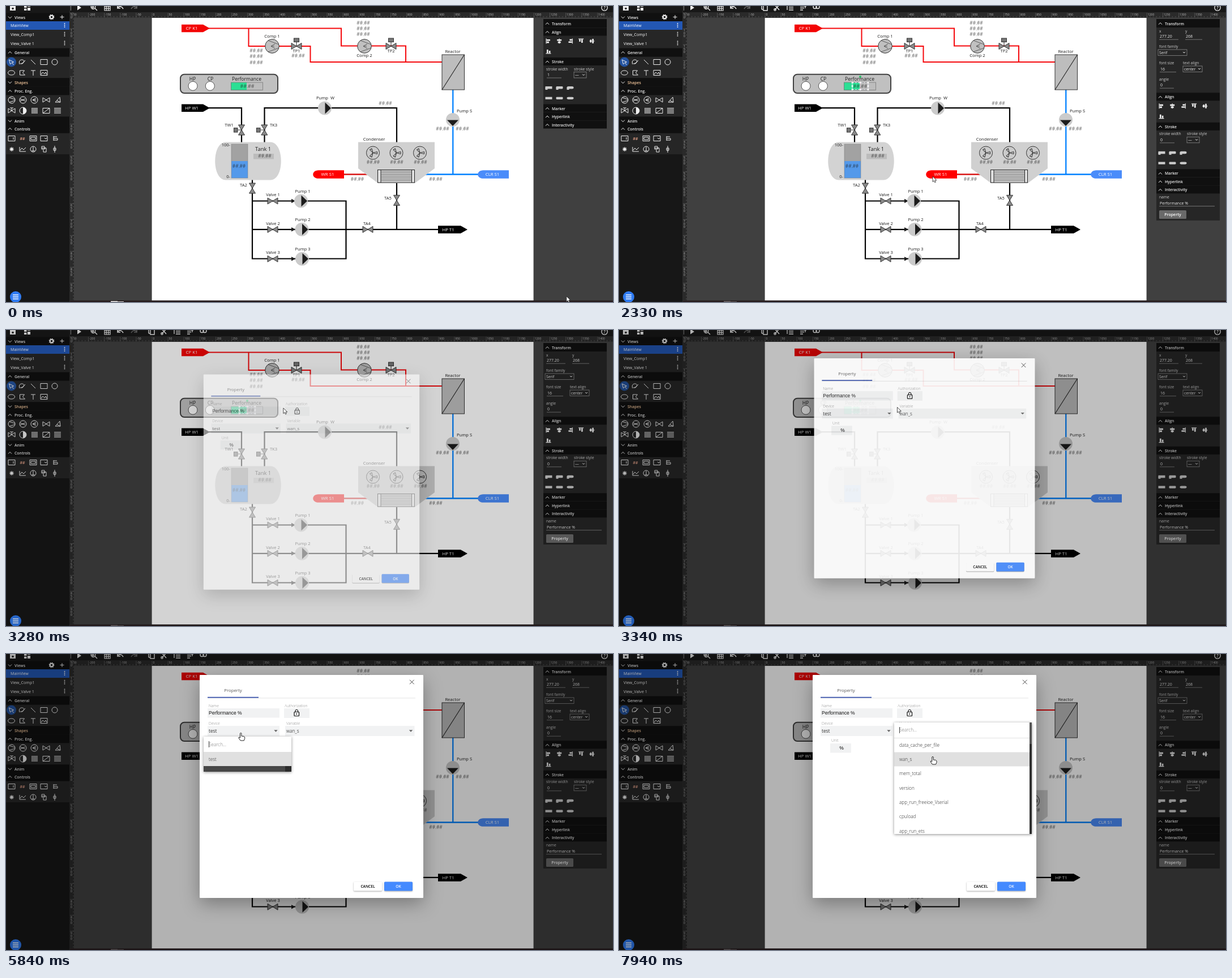
Write an HTML page that moves like this. It is 1072 px wide and 523 px high and loops after 8000 ms.

```html
<!DOCTYPE html>
<html lang="en">
<head>
<meta charset="utf-8">
<title>Process editor</title>
<style>
html, body { margin: 0; width: 100%; height: 100%; overflow: hidden; background: #000; }
svg { display: block; width: 1072px; height: 523px; font-family: "Open Sans", "Noto Sans", sans-serif; }
.m { text-anchor: middle; }
.e { text-anchor: end; }
.b { font-weight: 600; }
.l { font-weight: 300; }
.ico { fill: none; stroke: #eee; stroke-width: 1; }
.btn { filter: drop-shadow(0 1px .8px rgba(0,0,0,.35)); }
#dialog { filter: drop-shadow(0 10px 16px rgba(0,0,0,.32)); }
.drop { filter: drop-shadow(0 1.5px 2.5px rgba(0,0,0,.45)); }
</style>
</head>
<body>
<svg id="stage" viewBox="0 0 1072 523"></svg>
<script>
const P = (d, a = '') => `<path d="${d}" ${a}/>`;
const R = (x, y, w, h, f, a = '') => `<rect x="${x}" y="${y}" width="${w}" height="${h}" fill="${f}" ${a}/>`;
const C = (x, y, r, f, a = '') => `<circle cx="${x}" cy="${y}" r="${r}" fill="${f}" ${a}/>`;
const T = (x, y, s, z = 7.5, a = '') => `<text x="${x}" y="${y}" font-size="${z}" ${a}>${s}</text>`;
const G = (s, a = '') => `<g ${a}>${s}</g>`;
const at = (x, y, s, turn = 0) => G(s, `transform="translate(${x} ${y}) rotate(${turn})"`);
const M = 'class="m"', W = 'fill="#fff"', B = 'class="b" fill="#eee"';
const HEAD = '#101010', BODY = '#262626';
const line = (d, c = '#000', w = 2.2) => P(d, `fill="none" stroke="${c}" stroke-width="${w}"`);
const icon = (x, y, d, a = '') => at(x, y, P(d, `class="ico" ${a}`));
const hash = (x, y, z = 8.3) => T(x, y, '##.##', z, 'class="m l"');
const chevron = (x, y, up) => icon(x, y, up ? 'M-3 1.7L0-1.5 3 1.7' : 'M-3-1.5L0 1.7 3-1.5', 'stroke-width="1.5"');

function rulers() {
  let s = R(113, 11, 959, 9.5, '#2a2a2a') + R(113, 11, 7, 509, '#2a2a2a'), ticks = '';
  for (let v = -250; v <= 1400; v += 50) {
    const x = 258 + v * .562;
    s += T(x + 1.5, 16.5, v < -200 ? '50' : v, 5, 'fill="#bbb"');
    ticks += `M${x} 12V20`;
  }
  for (let x = 123.1; x < 1072; x += 5.62) ticks += `M${x} 18V20`;
  for (let v = 50; v <= 900; v += 50) {
    const y = -16 + v * .562;
    [...'' + v].forEach((c, i) => { s += T(114, y + 5 + i * 5, c, 5, 'fill="#bbb"'); });
    ticks += `M113 ${y}H120`;
  }
  for (let y = 23; y < 520; y += 5.62) ticks += `M118 ${y}H120`;
  return s + P(ticks, 'stroke="#777" stroke-width=".5"');
}

function toolbar() {
  return R(0, 0, 1072, 11, '#181818') +
    P('M7-2H15L17 0V8H7Z', 'fill="#eee"') + C(12, 4.5, 1.8, '#181818') +
    P('M32-2h4.5v5h-4.5zM38-2h5v3h-5zM32 4.5h4.5V8H32zM38 3h5v5h-5z', 'fill="#eee"') +
    R(114, 0, 1, 8, '#888') + P('M126-2L133 3 126 7.5Z', 'fill="#eee"') +
    line('M157 4L161 8M151 2H156M153.5-1V5', '#eee', 1.4) + C(154, 1.5, 3.8, 'none', 'stroke="#eee" stroke-width="1.3"') +
    line('M174-2V8H184V-2M174 1H184M174 4.5H184M177.3-2V8M180.7-2V8', '#eee', 1.2) +
    line('M197-1V4H202M197 3Q203-2 207 5', '#eee', 1.6) + line('M231-1V4H226M231 3Q225-2 221 5', '#666', 1.6) +
    C(1057, 3, 5.2, 'none', 'stroke="#eee" stroke-width="1.3"') + T(1057, 6, '?', 8, 'class="m b" fill="#eee"');
}

function sidebar() {
  let s = R(0, 11, 112, 512, '#171717') + R(112, 0, 1, 523, '#2b2b2b');
  const head = (y, name, up, c = '#eee') =>
    R(0, y - 7.5, 112, 14.5, HEAD) + chevron(7, y, up) + T(15, y + 2.6, name, 6.9, `class="b" fill="${c}"`);
  [[42, 33], [90, 37], [157.5, 38], [225, 37]].forEach(([y, h]) => s += R(0, y, 112, h, BODY));
  s += head(20, 'Views', 0) + R(0, 27, 112, 15, '#2357b4');
  ['MainView', 'View_Comp1', 'View_Valve 1'].forEach((n, i) => {
    const y = 34.5 + i * 15.7;
    s += T(8, y + 2.7, n, 7.1, W) + [-3, 0, 3].map(d => C(103.5, y + d - .5, .9, '#fff')).join('');
  });
  s += C(80.5, 19.5, 2.8, 'none', 'stroke="#eee" stroke-width="2"') +
    C(80.5, 19.5, 4.3, 'none', 'stroke="#eee" stroke-width="1.2" stroke-dasharray="1.7 1.68"') + icon(99, 19.5, 'M-3.5 0H3.5M0-3.5V3.5', 'stroke-width="1.3"');
  s += head(82, 'General', 1) + head(135, 'Shapes', 0, '#f3c79c') + head(150, 'Proc. Eng.', 1) + head(203, 'Anim', 0) + head(217, 'Controls', 1);
  const box = 'M-6-4.5H6V4.5H-6Z', ring = 'M-6 0A6 6 0 1 0 6 0A6 6 0 1 0-6 0Z', bow = 'M-6-4L6 4V-4L-6 4Z';
  s += C(9.5, 99, 8.5, '#24539f');
  [[9.5, 99, 'M-4-4L4 0 1 1 4 5M-4-4L-2 4 1 1'], [29, 99, 'M-5 4C-9-7 6-5 2 0S-7 2 0 3L5-3'], [48, 99, 'M-4-4L4 4'], [67, 99, box],
   [86, 99, 'M-5 0A5 5 0 1 0 5 0A5 5 0 1 0-5 0'], [9.5, 118, 'M-6 0A6 4 0 1 0 6 0A6 4 0 1 0-6 0'], [28.5, 118, 'M-4-4H4L1 0 5 4H-4Z'],
   [48, 118, 'M-4-4H4M0-4V5', 1.4], [67, 118, box + 'M-5 3L-2-1 1 2 3-1 5 3'], [10, 166, ring + 'M-4-4L6-1M-4 4L6 1'],
   [30, 166, ring + 'M-5-2L4 2M-5 2L4-2', 1.4], [50, 166, ring + 'M3-3L-3 0 3 3M-3 0H3'], [71, 166, bow], [92, 166, 'M-5 4L3-5 4 4ZM-2 1L4 4'],
   [10, 185, bow + 'M0 0V-5M-3-5H3'], [30, 185, ring], [71, 185, box + 'M-6 4.5L6-4.5'], [10, 234, box + 'M3-2V2'],
   [48, 234, box + 'M-4-2H4V2H-4Z', 1.4], [67, 234, box + 'M1-1L3 1 5-1'], [87, 234, 'M-3-4V4M-3-3H3M-3 0H4V3H-3'],
   [10, 253, 'M-4 0H4M0-4V4M-3-3L3 3M3-3L-3 3'], [29, 253, 'M-5-4V4H6M-4 2L-1-2 2 1 6-3'], [48, 253, 'M-5 0A5 5 0 1 0 5 0A5 5 0 1 0-5 0M0 3V-4M-3 3H3'],
   [67, 253, 'M-4-5H1V0H-4ZM0-2H4V5H-1V1M-4-2H3'], [86, 253, 'M0-6V6M-2-2H2V2H-2Z', 1.6]
  ].forEach(([x, y, d, w = 1]) => s += icon(x, y, d, `stroke-width="${w}"`));
  s += P('M30 179A6 6 0 0 1 30 191Z', 'fill="#eee"') + C(10, 253, 2.6, '#eee') + T(29, 236.5, '##', 7, 'class="m b" fill="#e9a58b"');
  for (let i = 0; i < 5; i++) s += line(`M45 ${180.5 + i * 2.2}H56M${45.8 + i * 2.3} 180V190`, '#ddd', .7) + line(`M85 ${180.5 + i * 2.2}H97`, '#ddd', 1);
  return s + C(17, 514, 10, '#2f7bf2') + line('M12 510.5H22M12 514H22M12 517.5H22', '#fff', 1.5);
}

const DARK = 'stroke="#333" stroke-width="1"';
const valve = (x, y, turn = 0, motor = 0) => at(x, y,
  (motor ? line('M0 0V-9', '#444', 1.2) + R(-4.5, -14, 9, 6.5, '#777', DARK) : '') +
  P('M-9-5.5L9 5.5V-5.5L-9 5.5Z', `fill="#8a8a8a" ${DARK}`), turn);
const pump = (x, y, turn = 0) => at(x, y, C(0, 0, 12, '#cbcbcb') + P('M.5-10L11 0 .5 10Z'), turn);
const comp = (x, y) => at(x, y, C(0, 0, 12.3, '#c0c0c0', DARK) +
  line('M-7-10L12-3M-7 10L12 3M5-4L-2 0 5 4M-2 0H4', '#444', .8));
const fan = x => at(x, 259.5, C(0, 0, 11.5, '#cbcbcb', DARK) + [0, 120, 240].map(a =>
  P('M0 0L7.5-2V2Z', `transform="rotate(${a})" fill="none" ${DARK} stroke-linejoin="round"`)).join(''));
const arrowTag = (x, y, name, c = '#000', w = 50) => at(x, y,
  P(`M0-6.8H${w - 12}L${w} 0 ${w - 12} 6.8H0Z`, `fill="${c}"`) + T(18, 2.9, name, 7.8, `${M} ${W}`));
const roundTag = (x, name, c) => at(x, 297.5,
  P('M10-7.3H55V7.3H10C-3 7.3-3-7.3 10-7.3Z', `fill="${c}"`) + T(26, 2.9, name, 7.8, `${M} ${W}`));

function diagram() {
  const red = '#f5080c', blue = '#0080ff';
  let s = R(257.6, 21, 674, 499.5, '#fff');
  s += line('M358 39.5H592V70.5H706V99M428.5 39.5V71H537.5V99H770', red, 2) +
    line('M789.3 148V297.5M722 297.5H836', blue, 2.3) + line('M596 297.5H656', '#d81313', 2.3) +
    line('M358 180.2H416V241M456.5 241V180.2H690V395M435 307V446.5H600.5V344.5H435M435 394.8H765');
  s += arrowTag(310, 39.5, 'CP K1', '#f30505') + arrowTag(310, 180.2, 'HP W1') + arrowTag(763, 395, 'HP T1', '#000', 52);
  s += comp(470, 71) + comp(633, 71) + valve(513, 71, 0, 1) + valve(680, 71, 0, 1);
  s += R(308, 120.7, 172, 33.3, '#c0c0c0', 'rx="7" stroke="#424242" stroke-width="2"') +
    C(330, 141.3, 8, '#fff', 'stroke="#555"') + C(360.3, 141.3, 8, '#fff', 'stroke="#555"') +
    T(329.5, 131.5, 'HP', 8.6, M) + T(361, 131.5, 'CP', 8.6, M) + T(425, 131.7, 'Performance', 8.6, M) +
    R(397, 135, 28, 14, '#2bdf94') + R(425, 135, 28, 14, '#bdbdbd') + R(397.5, 135, 56, 13.5, 'none', 'stroke="#777" stroke-width=".8"') + hash(426, 144.5, 8.9);
  s += P('M388 240.5H467C492 240.5 492 307.5 467 307.5H388C363 307.5 363 240.5 388 240.5Z', 'fill="#d3d3d3"') +
    R(398, 244, 29, 30, '#a2a2a2') + R(398, 274, 29, 30, '#5499ea') + R(398, 244, 29, 60, 'none', 'stroke="#777" stroke-width=".5"') +
    T(396, 248.3, '100-', 7.5, 'class="e"') + T(396, 304, '0-', 7.5, 'class="e"') + hash(411.5, 286) +
    T(440, 256, 'Tank 1', 9.4) + R(437, 261, 36, 9.5, '#bcbcbc') + hash(457, 268.2);
  s += valve(416, 219, 90) + valve(456.3, 219, 90) + R(402.5, 215.5, 6.5, 7.5, '#777', DARK) + R(442.5, 215.5, 6.5, 7.5, '#777', DARK) +
    line('M409 219H416M449 219H456', '#444', 1.2) + valve(435, 322, 90) + valve(690, 343.3, 90) + valve(639, 394.8);
  s += pump(563, 180.5) + pump(789, 201, 90);
  [[344.5, 521], [394.8, 522.5], [446.7, 523]].forEach(([y, x], i) => {
    s += valve(471, y) + P(`M504 ${y - 3.7}L511 ${y} 504 ${y + 3.7}Z`) + pump(x, y) +
      T(471.5, y - 8.3, 'Valve ' + (i + 1), 7.5, M) + T(524, y - 15, 'Pump ' + (i + 1), 7.5, M);
  });
  s += P('M622 240.5H757V287L722 313H657L622 287Z', 'fill="#d0d0d0"') + fan(648) + fan(689.5) + fan(731);
  s += R(656.5, 289.5, 65, 22.5, '#e2e2e2', 'stroke="#222"') + line('M662 289.5V312M716.5 289.5V312', '#222', 1);
  for (let y = 292; y < 311; y += 2.8) s += line(`M662 ${y}H716.5`, '#444', .9);
  s += roundTag(542, 'WR S1', '#ff0000') + roundTag(833, 'CLR S1', '#4a8cfa');
  s += R(770, 86, 39.5, 62, '#bdbdbd', DARK) + line('M770 148L809.5 86', '#222', 1.1);
  [[470, 56, 'Comp 1'], [633, 90, 'Comp 2'], [513, 82, 'TP1'], [680, 82, 'TP2'], [789, 83, 'Reactor'], [564, 165, 'Pump&#160; W'],
   [809.5, 187.5, 'Pump S'], [394, 212.5, 'TW1'], [472.5, 212.5, 'TK3'], [419.5, 319, 'TA2'], [674.5, 341.5, 'TA5'], [637.5, 386.5, 'TA4'], [650, 238.3, 'Condenser']
  ].forEach(([x, y, n]) => s += T(x, y, n, 7.6, M));
  [[442, 82], [442, 92.3], [442, 102.5], [516, 91], [631, 33], [631, 43], [631, 53], [670, 175], [771, 219.5], [806, 219.5],
   [648.5, 279], [690, 279], [732, 279], [620.5, 308.5], [759, 308.5]].forEach(([x, y]) => s += hash(x, y));
  return G(s, 'fill="#1c1c1c"');
}

const section = (y, name) => R(949, y - 7.5, 112, 14, HEAD) + chevron(956, y, 1) + T(964, y + 2.7, name, 6.8, B);
const label = (x, y, s) => T(x, y, s, 6.7, 'fill="#ccc"');
const field = (x, y, s, w, id = '') => T(x, y, s, 7, `fill="#eee" ${id}`) + line(`M${x - 1} ${y + 3.2}H${x + w}`, '#aaa', .6);
const select = (x, y, w, s) => R(x, y, w, 10.5, 'none', 'stroke="#999" stroke-width=".7"') +
  T(x + 2, y + 7.8, s, 6.8, 'fill="#eee"') + icon(x + w - 5, y + 5, 'M-2-1L0 1 2-1');

function sidePanel() {
  const side = 'M-4.5-4.5h1.2v9h-1.2zM-3-3h6v2.6h-6zM-3 .8h4v2.6h-4z';
  const centre = 'M-.6-4.5h1.2v9h-1.2zM-4-3h8v2.6h-8zM-2.5.8h5v2.6h-5z';
  const align = [[side, 0], [centre, 0], [side, 180], [side, 90], [centre, 90], [side, 270]].map(([d, turn], i) =>
    at(958 + i % 5 * 19.2, i < 5 ? 62 : 80, P(d, 'fill="#eee"'), turn)).join('');
  const ends = [0, 1, 2].map(i => {
    const x = 952.5 + i * 19, round = `rx="${i * 1.4}"`;
    return R(x, 142, 12, 4.5, '#ccc', round) + R(x, 144, 4, 4, '#ccc') + R(x, 160.7, 12, 4.2, '#ccc', round);
  }).join('');
  const mid = R(949, 38, 112, 178, BODY) + section(46, 'Align') + align + section(98.5, 'Stroke') +
    label(954, 113.5, 'stroke width') + label(1003, 113.5, 'stroke style') + field(956, 123.8, '1', 25, 'id="strokeW"') + select(1003, 116.5, 22, '—') +
    ends + section(181, 'Marker') + section(195.5, 'Hyperlink') + section(210, 'Interactivity');
  const extra = R(949, 38, 112, 341, BODY) + label(954, 46.5, 'x') + label(1000, 46.5, 'y') + field(955, 56, '277.20', 33) + field(1001, 56, '268', 29) +
    label(954, 74, 'font family') + select(952, 77, 51, 'Serif') + label(954, 103, 'font size') + label(996, 103, 'text align') +
    field(956, 113.5, '16', 28) + select(996, 106, 34, 'center') + label(954, 131.5, 'angle') + field(956, 142, '0', 24) +
    label(954, 340, 'name') + field(955, 350.5, 'Performance %', 97) + R(954, 361, 48, 15, '#6a6a6a', 'rx="1.5"') + T(978, 371.3, 'Property', 7, 'class="m b" fill="#fff"');
  return R(949, 23, 112, 15, HEAD) + G(extra, 'class="sel"') + G(mid, 'id="mid"') + section(31, 'Transform');
}

function selection() {
  let s = R(412, 135.5, 28, 12, 'none', 'stroke="#eef" stroke-width="1.1" stroke-dasharray="3 2"') + C(426, 125, 2, '#27c268');
  [412, 426, 440].forEach(x => [135.5, 141.5, 147.5].forEach(y => { if (x !== 426 || y !== 141.5) s += R(x - 1.3, y - 1.3, 2.6, 2.6, '#fff'); }));
  s += line('M252 0V6M252 6H254M255-2H262V8H255Z', '#eee', 1.4) + line('M275-2L283 7M283-2L275 7', '#eee', 1.5) +
    C(275.5, 6.5, 1.8, 'none', 'stroke="#eee" stroke-width="1.2"') + line('M300 0H308M300 3.5H308M300 7H308M297-2V7M320 0H331M320 3.5H327M320 7H325M329 0V4', '#eee', 1.3) +
    [343, 348].map(x => R(x, -1, 6, 5.5, 'none', 'rx="2.7" stroke="#eee" stroke-width="1.4"')).join('');
  return G(s, 'class="sel"');
}

function dialog() {
  const soft = '#f1f2f3', arial = 'font-family="Liberation Sans, sans-serif"';
  const cap = (x, y, s) => T(x, y, s, 6.7, 'class="l" fill="#888"');
  const tri = x => P(`M${x - 3.2} 134.3H${x + 3.2}L${x} 137.7Z`, 'fill="#666"');
  return R(342, 37, 395, 394, '#fff', 'rx="1"') + line('M713 45.7L720.6 53.3M720.6 45.7L713 53.3', '#444', 1) +
    T(401, 67.3, 'Property', 7.8, `${M} fill="#555"`) + R(356, 77.5, 367, .8, '#ddd') + R(356, 75.8, 90, 1.8, '#3e57ad') +
    cap(358, 93.5, 'Name') + cap(492, 93.5, 'Authorization') + cap(358, 125, 'Device') + cap(495, 125, 'Variable') + cap(375, 155.3, 'Unit') +
    R(356, 96, 127, 16.5, soft) + R(491, 96, 45, 17, soft) + R(356, 127, 127, 18, soft) + R(493, 127, 228.5, 18, soft) + R(373, 158, 37, 16.5, soft) +
    T(358, 107.2, 'Performance %', 8.5, `${arial} fill="#111"`) + T(393, 169.3, '%', 8.5, `${M} ${arial}`) +
    R(509, 102.5, 8.5, 7, 'none', 'rx=".8" stroke="#111" stroke-width="1.2"') + line('M511 102V100Q513.2 96.5 515.5 100V102.5', '#111', 1.2) + C(513.2, 106, 1, '#111') +
    T(358, 139, 'test', 8.3, 'fill="#333"') + T(495, 139, 'wan_s', 8.3, 'class="l"') + tri(476.5) + tri(715) +
    R(614, 402.6, 50, 16, '#fff', 'rx="1.5" class="btn"') + R(668, 402.6, 50, 16, '#448aff', 'rx="1.5" class="btn"') +
    T(639, 413.2, 'CANCEL', 6.6, 'class="m b"') + T(693, 413.2, 'OK', 6.6, 'class="m b" fill="#fff"');
}

const search = (x, y) => T(x, y, 'Search...', 8.2, 'class="l" fill="#777"');
const caret = (x, y) => R(x, y, .8, 11, '#111', 'class="caret"');
const deviceList = () => R(349, 146, 155, 62, '#fff') + search(358, 162.5) + caret(358, 154) + R(349, 173, 155, 25, '#e0e0e0') +
  G(R(349, 173, 145, 25, '#000', 'rx="3" opacity=".06"') + R(349, 173, 155, 25, '#000', 'opacity=".12"'), 'id="ripple"') +
  T(358, 189, 'test', 8.2, 'class="l" fill="#333"') + R(349, 198, 155, 10, '#474747') + R(493, 198, 11, 10, '#2c2c2c');
const names = ['data_cache_per_file', 'wan_s', 'mem_total', 'version', 'app_run_freeioe_Vserial', 'cpuload', 'app_run_ets'];
const variableList = () => R(486, 121, 243, 197, '#fff') + search(495, 137) + caret(495, 129) + R(486, 148, 239, .8, '#ddd') + R(486, 173.5, 239, 25, '#e0e0e0') +
  names.map((n, i) => T(495, 163.5 + i * 25.35, n, 8.2, 'class="l" fill="#222"')).join('') +
  R(725, 121, 4, 197, '#2f2f2f') + R(725, 121, 4, 38, '#555');

const cursors = P('M0 0V9.6L2.2 7.6 3.7 10.8 5.4 10.1 4 6.9H7Z', 'id="arrow" fill="#fff" stroke="#222" stroke-width=".8"') +
  P('M-1.2 1Q0-.5 1.2 1V6Q7 6 7 8V10.5L5.5 14H-.5L-4 9Q-4 7-1.2 9Z', 'id="hand" fill="#fff" stroke="#222" stroke-width="1"') +
  P('M0-9L3-5H1V-1H5V-3L9 0 5 3V1H1V5H3L0 9-3 5H-1V1H-5V3L-9 0-5-3V-1H-1V-5H-3Z', 'id="move" fill="#222" stroke="#fff" stroke-width=".7"');

const $ = id => document.getElementById(id);
$('stage').innerHTML = R(0, 0, 1072, 523, '#404040') + diagram() + rulers() + toolbar() + sidebar() + sidePanel() + selection() +
  R(113, 520.5, 959, 2.5, '#251a1c') + G(R(185, 521.5, 12, 1.5, '#fff') + R(197, 522, 11, 1, '#ddd'), 'id="strip"') +
  R(0, 0, 1072, 523, '#000', 'id="shade"') + G(dialog(), 'id="dialog"') +
  G(deviceList(), 'id="list1" class="drop"') + G(variableList(), 'id="list2" class="drop"') + G(cursors, 'id="cursor"');
const sel = document.querySelectorAll('.sel'), carets = document.querySelectorAll('.caret');

// Rows are [time, ...values]; values are interpolated between rows.
const path = [[0, 990, 513], [70, 980, 505], [350, 640, 330], [700, 421, 212], [850, 418, 206], [1010, 317, 170], [1120, 330, 145], [1330, 425, 133],
  [1580, 426, 136], [2110, 424, 139], [2250, 424, 139], [2330, 554, 301], [2560, 552, 300], [2800, 479, 142], [2970, 480, 142], [3040, 488, 141], [3190, 488, 141],
  [3340, 491, 136], [3480, 550, 200], [3900, 708, 403], [4120, 700, 398], [4290, 415, 139], [5430, 415, 139], [6680, 414, 139],
  [6850, 418, 180], [7050, 422, 181], [7160, 539, 151], [7470, 552, 130], [7600, 552, 133], [7860, 554, 181], [8000, 554, 181]];
const pop = [[3190, .914, 84, .045, .04], [3280, .965, 35, .55, .17], [3340, .987, 10.5, .9, .25], [3420, 1, 0, 1, .3]];
const fade1 = [[5560, 0], [5720, 1], [7120, 1], [7160, .76], [7250, 0]];
const fade2 = [[7540, 0], [7680, 1]];

function mix(rows, t) {
  const i = rows.findIndex(r => r[0] > t);
  if (i < 1) return rows[i ? rows.length - 1 : 0].slice(1);
  const a = rows[i - 1], b = rows[i], k = (t - a[0]) / (b[0] - a[0]);
  return a.slice(1).map((v, j) => v + (b[j + 1] - v) * k);
}
const show = (el, on) => el.setAttribute('display', on ? 'inline' : 'none');
function drop(el, o, top, opening) {
  show(el, o > 0);
  el.setAttribute('opacity', o);
  const k = opening ? .8 + .2 * o : 1;
  el.setAttribute('transform', `translate(0 ${top * (1 - k)}) scale(1 ${k})`);
}

function draw(t) {
  const picked = t >= 1800, open = t >= 3190;
  sel.forEach(el => show(el, picked));
  $('mid').setAttribute('transform', `translate(0 ${picked ? 114.8 : 0})`);
  $('strokeW').textContent = picked ? '0' : '1';
  $('strip').setAttribute('opacity', picked ? .35 : 1);

  const [k, dy, o, dim] = mix(pop, t);
  show($('shade'), open);
  show($('dialog'), open);
  $('shade').setAttribute('opacity', dim);
  $('dialog').setAttribute('opacity', o);
  $('dialog').setAttribute('transform', `translate(539.5 ${234 + dy}) scale(${k}) translate(-539.5 -234)`);

  drop($('list1'), mix(fade1, t)[0], 146, t < 6000);
  drop($('list2'), mix(fade2, t)[0], 121, true);
  show($('ripple'), t > 7000);
  show(carets[0], t < 7000 && (t - 5590) % 1000 < 500);
  show(carets[1], (t - 7560) % 1000 < 500);

  const [x, y] = mix(path, t);
  $('cursor').setAttribute('transform', `translate(${x} ${y})`);
  const move = t >= 2110 && t < 2260;
  const hand = t >= 3820 && t < 4130 || t >= 4280 && t < 7080 || t >= 7400;
  show($('move'), move);
  show($('hand'), hand);
  show($('arrow'), !move && !hand);
}

const start = performance.now();
(function tick() {
  draw((performance.now() - start) % 8000);
  requestAnimationFrame(tick);
})();
</script>
</body>
</html>
```
